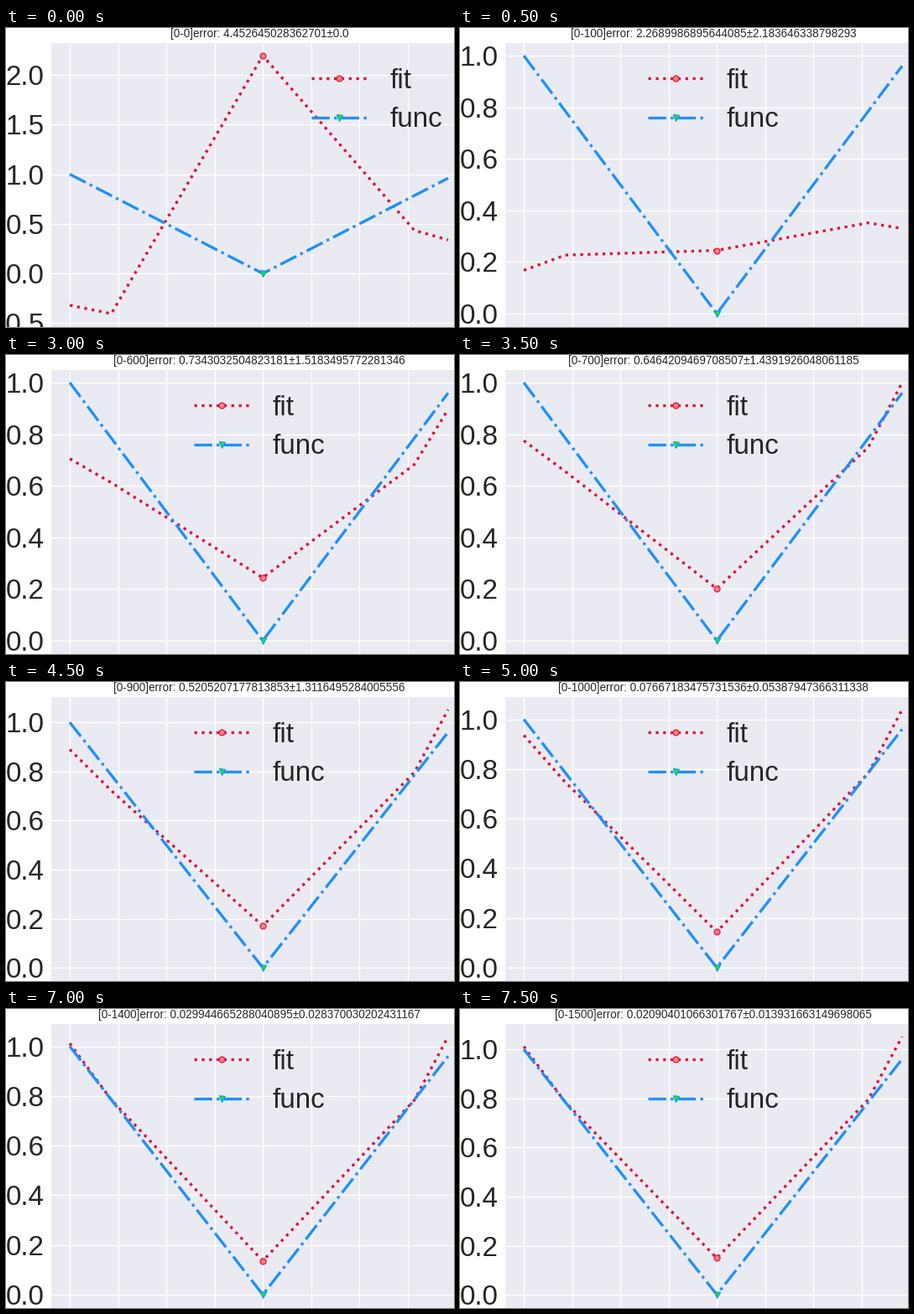
Animation of 534 by 357 pixels, one loop 8 s. Source, as a matplotlib script:

```python
import numpy as np
import matplotlib.pyplot as plt
from matplotlib.animation import FuncAnimation
from matplotlib.ticker import MultipleLocator, FuncFormatter

W, H, DPI = 534, 357, 64
PT = 72 / DPI  # points per pixel
STEPS = 16
INK = "#262626"

plt.rcParams["font.family"] = "Liberation Sans"
plt.rcParams["text.color"] = INK

BENDS = np.array([-1, -0.785, 0, 0.785, 0.96])
UNTRAINED = np.array([-0.320, -0.405, 2.195, 0.435, 0.338])


def settle(step, start, end, rate):
    """Exponential approach that is complete at step 12."""
    u = np.clip((step - 1) / 11, 0, 1)
    return start + (end - start) * (1 - np.exp(-rate * u)) / (1 - np.exp(-rate))


def smooth(step, start, end):
    u = np.clip((step - 1.4) / 6.1, 0, 1)
    return start + (end - start) * u * u * (3 - 2 * u)


def bump(step, center, width):
    return np.exp(-((step - center) / width) ** 2)


def fit_curve(step):
    if step == 0:
        return UNTRAINED
    wobble = 0.026 * np.cos(np.pi * (step - 9) / 3)
    return np.array([
        settle(step, 0.168, 1.012, 1.5),
        settle(step, 0.227, 0.785, 2),
        0.123 + 0.235 * bump(step, 3.6, 3.5) + wobble,
        smooth(step, 0.365, 0.770) + wobble,
        smooth(step, 0.343, 1.026) + wobble,
    ])


def report(step):
    """Mean and spread of the last ten errors."""
    k = np.arange(STEPS)
    errors = 0.014 + 0.146 * bump(k, 3.2, 2.6)
    errors[0] = 4.452645028362701
    recent = errors[max(0, step - 9):step + 1]
    return f"{float(recent.mean())}±{float(recent.std())}"


def line_style(color, ls, marker, fill):
    return dict(color=color, ls=ls, lw=3.33 * PT, marker=marker,
                ms=7 * PT, mfc=fill, mec=color, mew=1.2 * PT)


FIT_STYLE = line_style("crimson", ":", "o", "#ff7f7f")
FUNC_STYLE = line_style("dodgerblue", "-.", "v", "lime")

fig = plt.figure(figsize=(W / DPI, H / DPI), dpi=DPI, facecolor="white")

left, right, top, bottom = 53.5, 549.5, 17.6, 356.5
ax = fig.add_axes([left / W, 1 - bottom / H, (right - left) / W, (bottom - top) / H],
                  facecolor="#eaeaf2")
ax.set_xlim(-1.098, 1.058)
ax.set_xticks(np.arange(-1, 1.01, 0.25), labels=[])
ax.grid(color="white", lw=1.3 * PT)
ax.set_axisbelow(True)
ax.spines[:].set_visible(False)
ax.tick_params(length=0, pad=8 * PT, labelsize=33.3 * PT, labelcolor=INK)
ax.yaxis.set_major_formatter(
    FuncFormatter(lambda v, _: f"{round(v, 1) + 0:.1f}".replace("-", "−")))

fit_line, = ax.plot(BENDS, UNTRAINED, markevery=[2], **FIT_STYLE)
ax.plot([-1, 0, 0.96], [1, 0, 0.96], markevery=[1], **FUNC_STYLE)

# Pixel overlay for the title and the legend
stage = fig.add_axes([0, 0, 1, 1])
stage.set(xlim=(0, W), ylim=(H, 0))
stage.axis("off")
title = stage.text(302, 11, "", ha="center", va="baseline", fontsize=13.5 * PT)

legend = []
for y, name, style in [(60, "fit", FIT_STYLE), (107, "func", FUNC_STYLE)]:
    handle, = stage.plot([0, 33, 66], [y] * 3, markevery=[1], **style)
    label = stage.text(0, y + 11.5, name, va="baseline", fontsize=33.3 * PT)
    legend.append((handle, label))


def update(step):
    y = fit_curve(step)
    fit_line.set_ydata(y)
    lo, hi = min(y.min(), 0), max(y.max(), 1)
    pad = 0.05 * (hi - lo)
    ax.set_ylim(lo - pad, hi + pad)
    ax.yaxis.set_major_locator(MultipleLocator(0.5 if hi - lo > 1.5 else 0.2))

    title.set_text(f"[0-{100 * step}]error: {report(step)}")
    x0 = 364 if step == 0 else 224
    for handle, label in legend:
        handle.set_xdata([x0, x0 + 33.3, x0 + 66.6])
        label.set_x(x0 + 93)
    return []


anim = FuncAnimation(fig, update, frames=STEPS, interval=500,
                     repeat=True, repeat_delay=0, blit=False)
plt.show()
```
